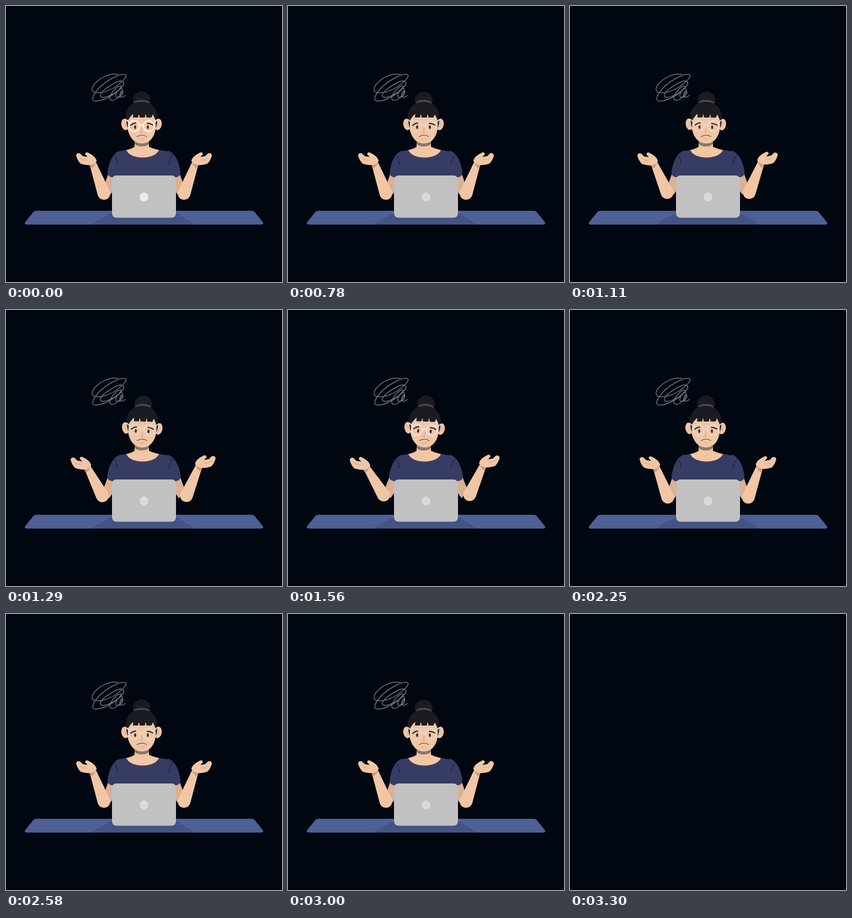
Write an HTML page that moves like this. It is 500 px wide and 500 px high and loops after 3330 ms.

```html
<!DOCTYPE html>
<html lang="en">
<head>
<meta charset="utf-8">
<title>Shrug at the laptop</title>
<style>
  html, body { margin: 0; width: 100%; height: 100%; overflow: hidden; background: #000711; }
  svg { display: block; width: 100vw; height: 100vh; }
  .skin { fill: #f0c6a5; }
  .shade { fill: #dcb091; }
  .shirt { fill: #373c65; }
  .hair { fill: #1b1c22; }
  .line { fill: none; stroke-linecap: round; stroke-linejoin: round; }
</style>
</head>
<body>
<svg viewBox="0 0 500 500">
  <defs>
    <g id="hand">
      <path fill="#c99a80" d="M150 286 L163 282 C162 288 158 292 155 294 Z"/>
      <path class="skin" d="M127 271 C127 266.500 132 265 135 268 L139 272 L148 273.500 L144 269.500 C142 265.500 147 263.500 151 267 C157 269.500 163 275 164 280 C164 285 158 287 154 288 C147 289 141 287 136 286 C132 283 129 278 127 271 Z"/>
      <path class="line" stroke="#d59d84" d="M134 275 Q140 280 147 279"/>
    </g>
    <path id="forearm" class="skin" d="M151.500 287 L163.500 284 L188 335 C191 344 185 351 177.500 351 C171.500 351 167.500 347 166 342 Z"/>
    <path id="upper" class="shade" d="M188 296 L204 300 L204 318 L189 342 L177 328 Z"/>
    <path id="sleeve" class="shirt" d="M207 262 C194 266 187 281 184 301 Q184 307 189 309.500 L204 313 L214 270 Z"/>
  </defs>
  <g id="scene">
    <path class="line" stroke="#6d7077" stroke-width="1.500" d="M203 124 C186 119 155 138 156 152 C157 161 182 158 200 145 C215 134 221 126 216 124 C204 122 176 138 164 154 C154 167 155 174 166 172 C182 170 204 156 212 144 C217 136 209 133 198 139 C184 146 170 156 171 163 C173 169 192 163 204 152 C214 143 205 142 196 152 C188 161 185 170 192 171 C201 171 214 155 210 150 C206 147 196 160 200 165 C206 168 214 158 211 154 C208 152 204 162 208 165 Q212 166 216 162"/>

    <g class="arm"><use href="#upper"/><use href="#forearm"/><use href="#hand"/><use href="#sleeve"/></g>
    <g transform="translate(500) scale(-1 1)">
      <g class="arm"><use href="#upper"/><use href="#forearm"/><use href="#hand"/><use href="#sleeve"/></g>
    </g>

    <path class="shirt" d="M219 260.500 C209 262.500 201 263.500 196 270 L196 316 H305 L304 270 C299 264 288 262.500 276 260.500 Z"/>
    <path class="line" stroke="#1f2344" stroke-width="1.300" d="M197 271 C200 276 202 281 201 287 M303.500 269 C298 275 295 281 295 288"/>
    <path class="skin" d="M233 240 H259 V255 C265 258 271 259 277 261 C273 270 261 274.500 247.500 274.500 C234 274.500 222 270 218 261 C224 259 229 258 233 255 Z"/>
    <path fill="#8c7769" d="M233 243 H259 V250 C253 256 239 256 233 250 Z"/>

    <g id="head">
      <circle class="hair" cx="246" cy="171" r="16"/>
      <ellipse fill="#4b494b" cx="246" cy="176" rx="14" ry="6"/>
      <path class="hair" d="M217 205 C216 185 228 173.500 245.500 173.500 C263 173.500 275 185 274 205 L272 215 H219 Z"/>
      <g class="skin">
        <ellipse cx="215.500" cy="214.500" rx="6.500" ry="10.500" transform="rotate(-10 215.500 214.500)"/>
        <ellipse cx="275.500" cy="214.500" rx="6.500" ry="10.500" transform="rotate(10 275.500 214.500)"/>
        <path d="M219 206 L226 196 H266 L272 206 C273 228 266 249 246 249 C227 249 218 228 219 206 Z"/>
      </g>
      <path class="line" stroke="#d9a486" d="M213 210 Q217 213 216 219 M278.500 210 Q274.500 213 275.500 219"/>
      <path class="hair" d="M217.500 207 L217.500 195 L224 188 H268 L274 195 L273.500 207 L271 207 L266 196 L263.500 202 H254.500 L253 195 L251.500 202 H242 L241 195 L239 202 H230 L230.500 195 C226 199 223 204 221 207 Z"/>
      <path class="hair" d="M218 206 H221 L220.500 221 Q218 215 218 206 M271 206 H274 Q274 215 271.500 221 Z"/>
      <path class="line" stroke="#272126" stroke-width="2" d="M226 216 Q230 212.500 235 212 M256 212.500 Q262 213 266 215.500"/>
      <g fill="#2b2023">
        <ellipse cx="234" cy="219.500" rx="1.700" ry="3.200"/>
        <ellipse cx="257" cy="219.500" rx="1.700" ry="3.200"/>
      </g>
      <path class="line" stroke="#d9a486" stroke-width="1.200" d="M246.500 221 Q247 226 244 229 H247 M242 240.500 Q246 242.500 250 240.500"/>
      <path class="line" stroke="#76594f" stroke-width="1.200" d="M237 237 Q246 231 255 236.500"/>
      <g id="glasses" class="line" stroke-width="1.800">
        <circle cx="232" cy="217.500" r="9.800"/>
        <circle cx="258.500" cy="217.500" r="9.800"/>
        <path d="M241.500 216.500 Q245 214.500 249 216.500 M218 206 L224 212 M274 206 L267 212"/>
      </g>
    </g>

    <path fill="#4e6097" d="M55 371 H445 Q449 371 451 374 L465 391 Q468 396 462 396 H38 Q32 396 35 391 L49 374 Q51 371 55 371 Z"/>
    <path fill="#435383" d="M194 373 H306 L343 396 H154 Z"/>
    <rect x="192" y="307" width="116" height="76.500" rx="8" fill="#c1c1c1"/>
    <circle id="dot" cx="250" cy="346" r="8"/>
  </g>
</svg>
<script>
const LOOP = 3330, END = 3300;
const SHRUG = [[0, 0], [780, 0], [1650, 1], [1880, 1], [2320, 0], [LOOP, 0]];
const SHINE = [[0, 1], [480, 0], [1400, 0], [1850, 1], [1980, 1], [2220, 0], [LOOP, 0]];

// elbow and hand offsets and forearm turn at the height of the shrug
const ARMS = [
  { elbow: [-2.5, -4.5], hand: [-15.5, 1.2], turn: -12 },
  { elbow: [-6, -5], hand: [-10.6, -3], turn: -4.5 }
];

const $ = id => document.getElementById(id);
const armParts = [...document.querySelectorAll('.arm')].map(g => g.children);
const set = (el, name, value) => el.setAttribute(name, value);
const move = ([x, y], p) => `translate(${x * p} ${y * p})`;
const grey = (from, to, k) => {
  const v = Math.round(from + (to - from) * k);
  return `rgb(${v},${v},${v})`;
};

function ease(table, t) {
  const i = table.findIndex(k => k[0] > t);
  const [t0, a] = table[i - 1], [t1, b] = table[i];
  return a + (b - a) * (1 - Math.cos(Math.PI * (t - t0) / (t1 - t0))) / 2;
}

function draw(t) {
  const p = ease(SHRUG, t);
  $('scene').style.display = t < END ? '' : 'none';
  set($('head'), 'transform', `rotate(${2.6 * p} 246 258)`);
  ARMS.forEach((arm, i) => {
    const [upper, forearm, hand, sleeve] = armParts[i];
    set(upper, 'transform', `rotate(${3 * p} 208 275)`);
    set(forearm, 'transform', `${move(arm.elbow, p)} rotate(${arm.turn * p} 177 348)`);
    set(hand, 'transform', move(arm.hand, p));
    set(sleeve, 'transform', `rotate(${2.5 * p} 208 275)`);
  });
  set($('glasses'), 'stroke', grey(220, 255, ease(SHINE, t)));
  set($('dot'), 'fill', grey(235, 218, Math.min(t / 480, 1)));
}

const start = performance.now();
function tick(now) {
  draw(Math.max(0, now - start) % LOOP);
  requestAnimationFrame(tick);
}
draw(0);
requestAnimationFrame(tick);
</script>
</body>
</html>
```
